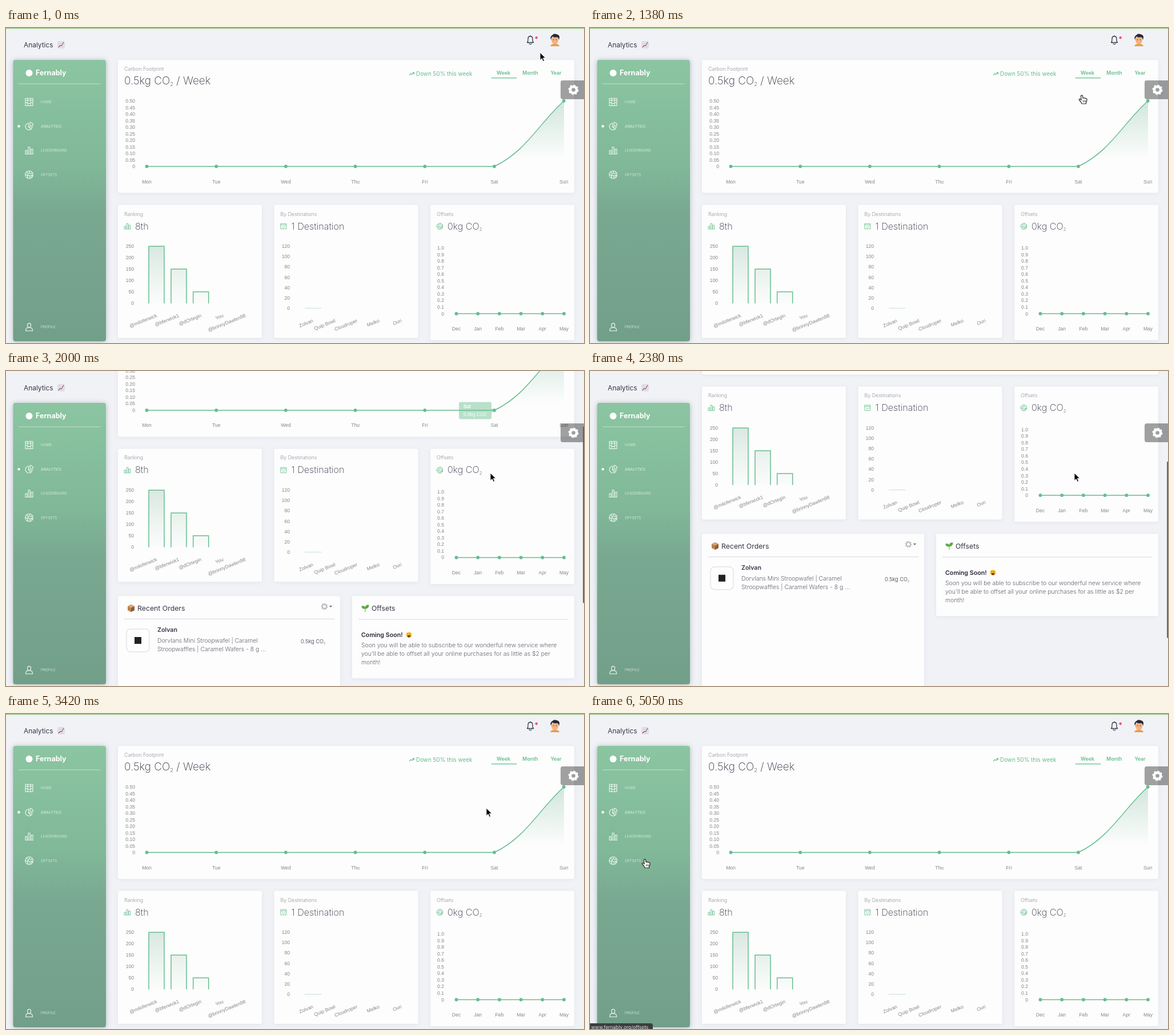
Write an HTML page that moves like this. It is 1012x553 px and loops after 5.09 s.

```html
<!DOCTYPE html>
<html lang="en">
<head>
<meta charset="utf-8">
<title>Analytics</title>
<style>
html, body { margin: 0; width: 100%; height: 100%; overflow: hidden; background: #f0f2f6; }
svg { display: block; width: 1012px; height: 553px; font-family: Inter, "Open Sans", sans-serif; }
.axis { font-family: "Liberation Sans", Arial, sans-serif; }
.card { fill: #fdfdfd; filter: drop-shadow(0 1px 3px rgba(60, 70, 110, .08)); }
.line { fill: none; stroke: #66bd8e; stroke-width: 1.5; }
.icon { fill: none; stroke-width: 1.1; stroke-linecap: round; stroke-linejoin: round; }
</style>
</head>
<body>
<svg id="stage" viewBox="0 0 1012 553"></svg>
<script>
const GREEN = '#66bd8e', DARK = '#343746', GREY = '#92949b', AXIS = '#858688';
const LOOP = 5090;

const text = (x, y, s, size, fill = DARK, weight = 400, more = '') =>
  `<text x="${x}" y="${y}" font-size="${size}" fill="${fill}" font-weight="${weight}" ${more}>${s}</text>`;
const axis = (x, y, s, anchor = 'middle', more = '') =>
  text(x, y, s, 8.6, AXIS, 400, `class="axis" text-anchor="${anchor}" ${more}`);
const slanted = (x, y, s) => axis(x, y, s, 'end', `transform="rotate(-22 ${x} ${y})"`);
const rect = (x, y, w, h, fill, r = 0, more = '') =>
  `<rect x="${x}" y="${y}" width="${w}" height="${h}" rx="${r}" fill="${fill}" ${more}/>`;
const card = (x, y, w, h) => rect(x, y, w, h, '#fdfdfd', 3, 'class="card"');
const dot = (x, y, r = 2.9, fill = GREEN) => `<circle cx="${x}" cy="${y}" r="${r}" fill="${fill}"/>`;
const path = (d, more) => `<path d="${d}" ${more}/>`;
const icon = (x, y, d, color, scale = 1) =>
  `<g class="icon" stroke="${color}" transform="translate(${x} ${y}) scale(${scale})"><path d="${d}"/></g>`;
const sub = '<tspan font-size="50%" dy="2.5">2</tspan>';
const scale = (x, y, step, labels) => labels.map((s, i) => axis(x, y + i * step + 3, s, 'end')).join('');
const range = (n, f) => Array.from({ length: n }, (_, i) => f(i));

// Icons are drawn around (0, 0), about 14 units wide
const HOME = 'M-6.5-6.5h13v13h-13zM-6.5-3.2h13M-2.5-3.2v9.7M2.5-3.2v9.7M-6.5 1h4M2.5 1h4M-2.5 2.5h5M-2.5-6.5v3.3M2.5-6.5v3.3';
const PIE = 'M-1-5.5A6 6 0 1 0 5.5 1H-1zM1.5-7A6 6 0 0 1 7-1.5H1.5zM-1 1L3.5 5.5';
const BARS = 'M-6.5 0h3v6.5h-3zM-1.5-6h3v12.5h-3zM3.5-2.5h3v9h-3z';
const GLOBE = 'M-6.8 0a6.8 6.8 0 1 0 13.6 0a6.8 6.8 0 1 0-13.6 0M-5-4l3 1l1 2l-3 2l-2-1M-2 6l-1-4l3-1l2 2l-1 3.5M1-6.5l-1 3l3 2l3-2M3 1l3 0l-1 3z';
const USER = 'M-3-3a3 3.6 0 1 0 6 0a3 3.6 0 1 0-6 0M-6 6.8c0-6 3-6 6-6s6 0 6 6z';
const BAG = 'M-6-6h12v12h-12zM-6-3h12M-2.8 0c0 4 5.6 4 5.6 0';

const gear = (x, y, r, color, hole) =>
  `<g fill="none" stroke="${color}"><circle cx="${x}" cy="${y}" r="${r * .62}" stroke-width="${r * hole}"/>
   <circle cx="${x}" cy="${y}" r="${r * .88}" stroke-width="${r * .26}" pathLength="80" stroke-dasharray="5 5"/></g>`;

function header() {
  return rect(0, 0, 1012, 1.2, '#94bd78') +
    path('M912.5 25.5c2-2 1.5-4 1.5-6.5c0-6 8-6 8 0c0 2.5-.5 4.5 1.5 6.5zM916 27.5c1 1.5 3 1.5 4 0M918 14.5v-1',
      'class="icon" stroke="#343746" style="stroke-width:1.3"') +
    dot(928.7, 17, 2.2, '#ef4d72') +
    path('M953 32q1-4 6-4h4q5 0 6 4z', 'fill="#e9a13e"') +
    rect(958.5, 24, 5, 6, '#e39d70', 2) +
    path('M955 17q6-4 12 0v5q-1 6-6 6t-6-6z', 'fill="#f3b184"') +
    path('M954 21q-2-6 2-8q3-4 8-2q5 1 5 5q0 3-1 5q0-4-3-5q-5 1-8-1q-2 1-3 6z', 'fill="#292733"') +
    dot(958.7, 20.5, .7, '#333') + dot(963.5, 20.5, .7, '#333');
}

function footprint() {
  const x = i => 246.5 + i * 121.7;
  const curve = 'C911 216.5 935 165 977 128';
  return card(196, 56, 799, 233.5) +
    text(207, 75, 'Carbon Footprint', 8.9, GREY, 300) +
    text(207, 99, `0.5kg CO${sub}<tspan dy="-2.5"> / Week</tspan>`, 18.9, DARK, 200) +
    icon(710.5, 80.5, 'M-4 2L-1.5-.5L.5 1L4-2.5M1.5-2.5H4V0', GREEN) +
    text(718, 83.5, 'Down 50% this week', 9.9, GREEN) +
    [['Week', 871], ['Month', 918], ['Year', 963]].map(([s, m]) =>
      text(m, 81.5, s, 8.8, GREEN, 600, 'text-anchor="middle"')).join('') +
    rect(850, 87, 44, 1.3, GREEN) +
    scale(226, 128, 11.5, range(11, i => i == 10 ? '0' : (.5 - i * .05).toFixed(2))) +
    path(`M855 243${curve}V243z`, 'fill="url(#area)"') +
    path(`M246.5 243H855${curve}`, 'class="line"') +
    ['Mon', 'Tue', 'Wed', 'Thu', 'Fri', 'Sat', 'Sun'].map((s, i) =>
      dot(x(i), i < 6 ? 243 : 128) + axis(x(i), 272.5, s)).join('');
}

function panel(x, h, title, value, glyph) {
  return card(x, 310.5, 252, h) + text(x + 11, 329.5, title, 8.9, GREY, 300) +
    icon(x + 16.5, 348, glyph, GREEN, .78) + text(x + 30, 353.5, value, 16.2, DARK, 200);
}

function middleRow() {
  const users = ['@miloferwick', '@bferwick1', '@dOrtegin', 'You', '@brinnyDawlen98'];
  const shops = ['Zolvan', 'Quip Bowl', 'Cloudroper', 'Melko', 'Ovri'];
  const bar = (x, y) => rect(x, y, 27, 483 - y, 'url(#bar)') + path(`M${x} 483.5V${y}h27V483.5`, 'class="line"');
  return panel(196, 233.5, 'Ranking', '8th', BARS) +
    scale(224, 383, 20, [250, 200, 150, 100, 50, 0]) +
    bar(250, 383.3) + bar(289, 423.3) + bar(327.7, 463.3) +
    users.map((s, i) => slanted(265 + i * 38.8, 507, s)).join('') +
    panel(469.5, 233.5, 'By Destinations', '1 Destination', BAG) +
    scale(497, 383, 18.2, [120, 100, 80, 60, 40, 20, 0]) +
    rect(523, 491.5, 29, 1, '#c0dfdb') +
    shops.map((s, i) => slanted(538.5 + i * 38.7, 516, s)).join('') +
    panel(743, 237.5, 'Offsets', `0kg CO${sub}`, GLOBE) +
    scale(767, 386, 11.55, range(11, i => i == 10 ? '0' : (1 - i / 10).toFixed(1))) +
    path('M788.5 501.5H977', 'class="line"') +
    ['Dec', 'Jan', 'Feb', 'Mar', 'Apr', 'May'].map((s, i) =>
      dot(788.5 + i * 37.7, 501.5) + axis(788.5 + i * 37.7, 531, s)).join('');
}

function bottomRow() {
  const body = (x, y, s) => text(x, y, s, 10.38, '#62646e', 300);
  return card(196, 569, 389, 400) + card(606, 569, 389, 144.5) +
    path('M213 587l6-3l6 3v7l-6 3l-6-3z', 'fill="#b9834f"') +
    path('M213 587l6 3l6-3l-6-3z', 'fill="#d6a574"') + path('M219 590v7l6-3v-7z', 'fill="#8f5f38"') +
    text(230, 595, 'Recent Orders', 12.3) +
    gear(557.5, 587.5, 5.5, '#8b8d94', .16) + path('M565.5 586h6l-3 3z', 'fill="#777"') +
    rect(207, 609, 368, 1, '#d6d4e4') +
    rect(211, 627, 40, 40, '#fefefe', 7, 'stroke="#e3e4ea" stroke-width="1.5"') +
    rect(225, 641, 12, 12, '#222') +
    text(265, 632.5, 'Zolvan', 10.6, DARK, 600) +
    body(265, 651, 'Dorvlans Mini Stroopwafel | Caramel') +
    body(265, 666, 'Stroopwaffles | Caramel Wafers - 8 g ...') +
    text(516, 652, `0.5kg CO${sub}`, 9.3, DARK, 300) +
    path('M629 597v-6q-6 1-6-4q6-1 6 4q0-7 6-6q0 6-6 6', 'fill="#58ab3d" stroke="#58ab3d"') +
    text(640, 595, 'Offsets', 12.2) +
    rect(617, 609.5, 367, 1, '#d6d4e4') +
    text(622, 641, 'Coming Soon!', 10.7, '#262936', 600) +
    dot(705.5, 637.2, 5.2, '#fbc540') + dot(703.7, 635.7, .8, '#563c20') + dot(707.3, 635.7, .8, '#563c20') +
    path('M702.5 638h6q-.5 3.5-3 3.5t-3-3.5z', 'fill="#6b3a20"') +
    body(622, 659, 'Soon you will be able to subscribe to our wonderful new service where') +
    body(622, 674, "you'll be able to offset all your online purchases for as little as $2 per") +
    body(622, 689, 'month!');
}

function sidebar() {
  const items = [['HOME', 130, HOME], ['ANALYTICS', 172.5, PIE], ['LEADERBOARD', 215, BARS],
    ['OFFSETS', 257.5, GLOBE], ['PROFILE', 525, USER]];
  return text(31, 34, 'Analytics', 11.9) +
    rect(91, 24, 11, 11, '#e7e9ee', 1, 'stroke="#b9bcc8" stroke-width=".6"') +
    path('M92 27.5h9M92 31h9M95 24.5v10M98.5 24.5v10', 'stroke="#b8c7dc" stroke-width=".6"') +
    path('M92 33.5l3-3l2 1l4-6.5', 'class="icon" stroke="#c5405c"') +
    rect(12.5, 56, 162.5, 494, 'url(#side)', 4, 'style="filter:drop-shadow(0 1px 5px rgba(40,60,60,.3))"') +
    dot(40.5, 79, 6, '#fff') + text(52, 83.3, 'Fernably', 12.5, '#fff', 700) +
    rect(22, 97.5, 143, 1, 'rgba(255,255,255,.5)') +
    items.map(([s, y, d]) => icon(40.5, y, d, '#eff8f2') +
      text(61, y + 2.3, s, 6.4, '#e6f2ea', s == 'ANALYTICS' ? 400 : 300)).join('') +
    dot(22.5, 172.5, 2.2, '#fff');
}

const stop = (at, color, a = 1) => `<stop offset="${at}" stop-color="${color}" stop-opacity="${a}"/>`;
const fade = (id, stops, box = 'y1="0" y2="1"') =>
  `<linearGradient id="${id}" x1="0" x2="0" ${box}>${stops}</linearGradient>`;

const stage = document.getElementById('stage');
stage.innerHTML = `<defs>
  ${fade('side', stop(0, '#8bc5a1') + stop(.38, '#80b898') + stop(.55, '#79a891') + stop(1, '#729f89'))}
  ${fade('area', stop(0, '#8abfaa', .38) + stop(.9, '#8ac5a5', 0))}
  ${fade('bar', stop(0, '#8ab5a4', .3) + stop(1, '#8ac5a5', .02), 'y1="383" y2="483" gradientUnits="userSpaceOnUse"')}</defs>
  <rect width="1012" height="553" fill="#f0f2f6"/>
  <g id="page">${header()}${footprint()}${middleRow()}${bottomRow()}
    <g id="tip">${rect(793, 228.5, 57, 30, GREEN, 3)}${path('M850 239l5 4l-5 4z', `fill="${GREEN}"`)}
      ${text(801, 239.5, 'Sat', 8.4, '#fff', 600, 'class="axis"')}
      ${text(801, 253, '0.0kg CO2', 8.4, '#fff', 400, 'class="axis"')}</g></g>
  ${sidebar()}
  ${path('M1012 92h-37q-4 0-4 4v25q0 4 4 4h37z', 'fill="rgba(0,0,0,.37)"')}
  ${gear(993.5, 108.5, 9, '#fff', .5)}
  <rect id="thumb" x="1010.2" width="4" height="310" rx="1.5" fill="#5d5d5f"/>
  <g id="status">${path('M0 543h106q4 0 4 4v6H0z', 'fill="#3b3e3d"')}
    ${text(2, 552.5, 'www.fernably.org/offsets', 8.4, '#dfe1e0')}</g>
  <g id="arrow" stroke="#fff" stroke-linejoin="round">
    ${path('M0 0V13.5L3.2 10.6L5.4 15.6L7.6 14.6L5.5 9.7H9.8z', 'fill="#000"')}</g>
  <g id="hand">${path('M-1.5-6.5q1.5-1.5 3 0l.5 4q1.5-1 2.5.3q1.5-.8 2.5.5q2-.5 2 1.5q0 4-1.5 5.5v2.2h-7.5q-.5-2.5-4-6q-1.5-2 .2-2.5q1.3 0 2.8 2z',
    'fill="#fff" stroke="#222" stroke-width="1.2" stroke-linejoin="round" transform="translate(-1 .5)"')}
    ${path('M1.5 2v3M3.5 2v3M5.5 2v3', 'stroke="#222" stroke-width=".8"')}</g>`;

const [page, tip, thumb, status, arrow, hand] =
  ['page', 'tip', 'thumb', 'status', 'arrow', 'hand'].map(id => document.getElementById(id));

// Keys are [time, ...values], eased between neighbours
function track(keys, t) {
  const n = keys.findIndex(k => k[0] > t);
  if (n == 0) return keys[0].slice(1);
  if (n < 0) return keys[keys.length - 1].slice(1);
  const a = keys[n - 1], b = keys[n], u = (t - a[0]) / (b[0] - a[0]), e = u * u * (3 - 2 * u);
  return a.slice(1).map((v, i) => v + (b[i + 1] - v) * e);
}

const pointer = [[0, 935, 43], [200, 935, 43], [550, 962, 80], [850, 918, 80], [1180, 871, 83],
  [1380, 862, 125], [1640, 848, 179], [3290, 848, 179], [4000, 769, 25], [4150, 769, 25], [4940, 97, 262]];
const scrolling = [[1700, 0], [2000, 174], [2300, 283.3], [2420, 283.3], [2770, 0]];
const tipFade = [[1560, 0], [1680, .85], [1880, .85], [2000, .45], [2130, 0]];
const barFade = [[1620, 0], [1680, 1], [3000, 1], [3250, 0]];

function draw(now) {
  const t = now % LOOP;
  const [x, y] = track(pointer, t), [scroll] = track(scrolling, t);
  const tab = t < 1500 && x > 850 && y > 68, link = t > 4200 && x < 115;
  page.setAttribute('transform', `translate(0 ${-scroll})`);
  tip.setAttribute('opacity', track(tipFade, t)[0]);
  thumb.setAttribute('y', scroll * .56);
  thumb.setAttribute('opacity', track(barFade, t)[0]);
  status.setAttribute('visibility', link ? 'visible' : 'hidden');
  for (const [g, on] of [[hand, tab || link], [arrow, !tab && !link]]) {
    g.setAttribute('visibility', on ? 'visible' : 'hidden');
    g.setAttribute('transform', `translate(${x} ${y})`);
  }
}

const start = performance.now();
(function tick() {
  draw(performance.now() - start);
  requestAnimationFrame(tick);
})();
</script>
</body>
</html>
```
